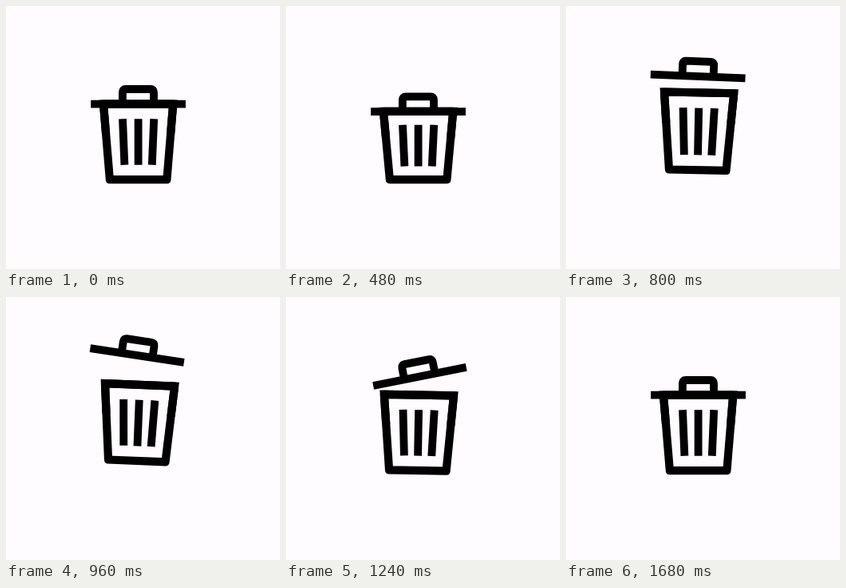
Recreate the animation shown at these times as an HTML page. Size 343 px wide and 329 px high, loop 1720 ms.

```html
<!DOCTYPE html>
<html lang="en">
<head>
<meta charset="utf-8">
<title>Bin</title>
<style>
  html, body { margin: 0; width: 100%; height: 100%; overflow: hidden; background: #fefcff; }
  svg { display: block; width: 100vw; height: 100vh; }
  path { fill: none; stroke: #000; stroke-width: 9.8; }
  #shell, #rim { stroke-width: 10.2; }
</style>
</head>
<body>
<svg viewBox="0 0 343 329">
  <g id="body">
    <path id="shell" stroke-linejoin="round"/>
    <path id="rim"/>
    <path id="bars"/>
  </g>
  <g id="lid">
    <path d="M106.2 122.7H224.9"/>
    <path d="M145.9 121V108Q145.9 104 149.9 104H181Q185 104 185 108V121"/>
  </g>
</svg>
<script>
const LOOP = 1720, STEP = 40, CX = 165.6, TOP = 122.6, BASE = 217.1;
const $ = id => document.getElementById(id);

// Smooth 0..1 between two times; a higher power brings the change forward
function ease(t, from, to, power = 1) {
  const u = Math.min(1, Math.max(0, (t - from) / (to - from)));
  const w = 1 - (1 - u) ** power;
  return w * w * (3 - 2 * w);
}

function place(id, y, tilt, pivot) {
  $(id).setAttribute('transform', `translate(0 ${y}) rotate(${tilt} ${CX} ${pivot})`);
}

function draw(t) {
  const crouch = ease(t, 300, 610);
  const spring = ease(t, 630, 800), settle = ease(t, 800, 1040);
  const scale = 1 - 0.16 * crouch * (1 - spring) + 0.025 * (spring - settle);

  const y = n => BASE + (n - BASE) * scale;
  const top = y(TOP), mid = y(160);
  $('shell').setAttribute('d', `M122 ${top}L129.9 ${BASE}H201.4L209.2 ${top}Z`);
  $('rim').setAttribute('d', `M125.1 ${mid}L122 ${top}H209.2L206.1 ${mid}`);
  $('bars').setAttribute('d', [-1, 0, 1]
    .map(i => `M${CX + 19.6 * i} ${y(141.3)}L${CX + 17.2 * i} ${y(198.7)}`).join(''));

  const hop = ease(t, 640, 860) * (1 - ease(t, 860, 1250));
  const lean = ease(t, 680, 920) * (1 - ease(t, 960, 1480));
  place('body', -14.5 * hop, 2.3 * lean, 170);

  const rise = ease(t, 630, 960, 1.6), fall = ease(t, 930, 1520);
  const lidY = 15.2 * crouch * (1 - rise) - 50 * rise * (1 - fall);
  const lidTilt = 11 * ease(t, 750, 920) - 25.6 * ease(t, 920, 1130) + 14.6 * ease(t, 1130, 1480);
  place('lid', lidY, lidTilt, 113);
}

let start;
function tick(now) {
  if (start === undefined) start = now;
  const t = (now - start) % LOOP;
  draw(Math.floor(t / STEP) * STEP);
  requestAnimationFrame(tick);
}
draw(0);
requestAnimationFrame(tick);
</script>
</body>
</html>
```
